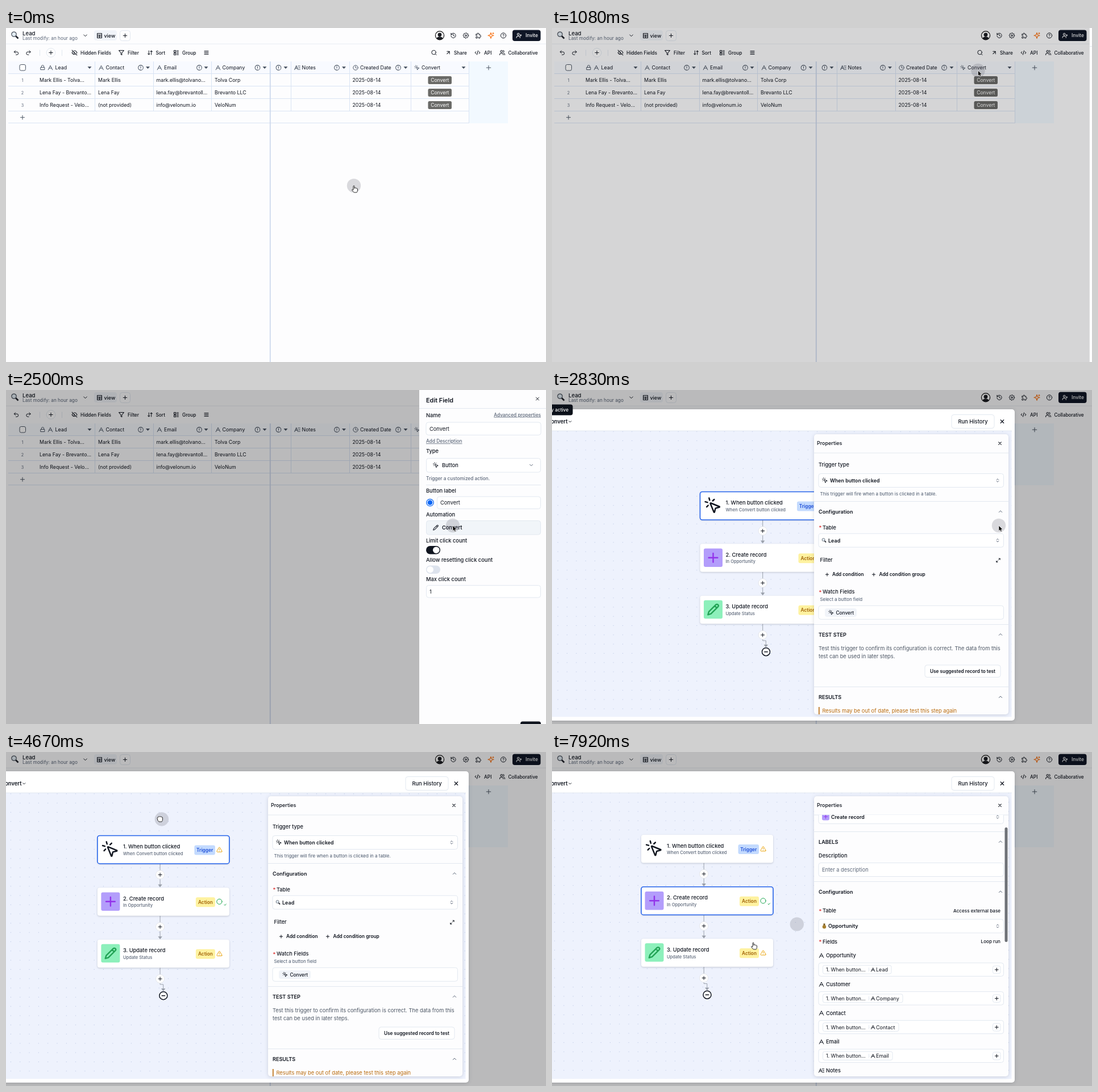
Animation, 950 px wide and 589 px high, one loop 8000 ms. Source, as an HTML page:

```html
<!DOCTYPE html>
<html lang="en">
<head>
<meta charset="utf-8">
<title>Lead conversion</title>
<style>
html, body { margin: 0; width: 100%; height: 100%; overflow: hidden; background: #fdfdfe; }
svg { display: block; width: 100vw; height: 100vh; font-family: Inter, "Open Sans", sans-serif; }
.i { fill: none; stroke-linecap: round; stroke-linejoin: round; }
.node { filter: drop-shadow(0 1.5px 1.5px rgba(30, 41, 59, .22)); }
.box { filter: drop-shadow(0 1px 3px rgba(15, 23, 42, .16)); }
</style>
</head>
<body>
<svg id="stage" viewBox="0 0 950 589"></svg>
<script>
const INK = '#10151f', GREY = '#5b6678', LINE = '#e2e8f0', GRID = '#d9e4f4', BLUE = '#2563eb';
const RING = 'M22 12a10 10 0 1 1-20 0 10 10 0 0 1 20 0z';

const gear = () => {
  let d = '';
  for (let i = 0; i < 32; i++) {
    const a = i * Math.PI / 16, r = i % 4 < 2 ? 10.5 : 8;
    d += (i ? 'L' : 'M') + (12 + r * Math.cos(a)).toFixed(2) + ' ' + (12 + r * Math.sin(a)).toFixed(2);
  }
  return d + 'zM15 12a3 3 0 1 1-6 0 3 3 0 0 1 6 0z';
};

const ICONS = {
  undo: 'M9 14 4 9l5-5M4 9h10.5a5.5 5.5 0 0 1 0 11H11',
  redo: 'm15 14 5-5-5-5M20 9H9.5a5.5 5.5 0 0 0 0 11H13',
  plus: 'M5 12h14M12 5v14',
  minus: 'M7 12h10',
  x: 'M18 6 6 18M6 6l12 12',
  down: 'm6 9 6 6 6-6',
  up: 'm18 15-6-6-6 6',
  updown: 'm7 15 5 5 5-5M7 9l5-5 5 5',
  eyeoff: 'M9.9 4.2A9 9 0 0 1 12 4c7 0 10 8 10 8a13 13 0 0 1-1.7 2.7M6.6 6.6A13.5 13.5 0 0 0 2 12s3 7 10 7a9.7 9.7 0 0 0 5.4-1.6M2 2l20 20M10 10a3 3 0 0 0 4 4',
  filter: 'M22 3H2l8 9.5V19l4 2v-8.5z',
  sort: 'm3 16 4 4 4-4M7 20V4M21 8l-4-4-4 4M17 4v16',
  group: 'M3 3h7v7H3zM3 14h7v7H3zM14 4h7M14 9h7M14 15h7M14 20h7',
  menu: 'M4 6h16M4 12h16M4 18h16',
  search: 'M19 11a8 8 0 1 1-16 0 8 8 0 0 1 16 0zM21 21l-4.3-4.3',
  share: 'M7 7h10v10M7 17 17 7',
  code: 'm18 16 4-4-4-4M6 8l-4 4 4 4M14.5 4l-5 16',
  users: 'M16 21v-2a4 4 0 0 0-4-4H6a4 4 0 0 0-4 4v2M13 7a4 4 0 1 1-8 0 4 4 0 0 1 8 0zM22 21v-2a4 4 0 0 0-3-3.9M16 3.1a4 4 0 0 1 0 7.8',
  invite: 'M16 21v-2a4 4 0 0 0-4-4H6a4 4 0 0 0-4 4v2M13 7a4 4 0 1 1-8 0 4 4 0 0 1 8 0zM19 8v6M22 11h-6',
  history: 'M3 12a9 9 0 1 0 9-9 9.7 9.7 0 0 0-6.7 2.7L3 8M3 3v5h5M12 7v5l4 2',
  gear: gear(),
  puzzle: 'M8 7V5a2.5 2.5 0 0 1 5 0v2h5v5h1.5a2.5 2.5 0 0 1 0 5H18v5h-5v-1.5a2.5 2.5 0 0 0-5 0V22H3v-5h1.5a2.5 2.5 0 0 0 0-5H3V7z',
  spark: 'M12 2l2.5 7.5L22 12l-7.5 2.5L12 22l-2.5-7.5L2 12l7.5-2.5zM20 2v4M18 4h4',
  help: RING + 'M9.1 9a3 3 0 0 1 5.8 1c0 2-3 3-3 3M12 17h.01',
  info: RING + 'M12 7v6M12 16.5h.01',
  clock: RING + 'M12 6v6l4 2',
  check: RING + 'm8.5 12 2.5 2.5 5-5',
  lock: 'M4 11h16v10H4zM7 11V7a5 5 0 0 1 10 0v4',
  text: 'M3 21 12 3l9 18M6.5 14h11',
  notes: 'M1 20 8 4l7 16M4 14h8M15 5h8M17 12h6M18 19h5',
  click: 'M14 4.1 12 6M5.1 8l-2.9-.8M6 12l-1.9 2M7.2 2.2 8 5.1M9 9.7a.5.5 0 0 1 .7-.7l11 4.5a.5.5 0 0 1-.1 1l-4.3 1a1 1 0 0 0-.8.8l-1 4.3a.5.5 0 0 1-1 .1z',
  pencil: 'M21.2 6.8a1 1 0 0 0-4-4L3.8 16.2 2 22l5.8-1.8zM15 5l4 4',
  table: 'M3 3h18v18H3zM3 9h18M3 15h18M12 9v12',
  expand: 'M15 3h6v6M9 21H3v-6M21 3l-7 7M3 21l7-7',
  warn: 'm21.7 18-8-14a2 2 0 0 0-3.5 0l-8 14A2 2 0 0 0 4 21h16a2 2 0 0 0 1.7-3zM12 9v4M12 17h.01'
};

const R = (x, y, w, h, fill, stroke = 'none', rx = 0, more = '') =>
  `<rect x="${x}" y="${y}" width="${w}" height="${h}" rx="${rx}" fill="${fill}" stroke="${stroke}" ${more}/>`;
const C = (x, y, r, fill, stroke = 'none', sw = 1) =>
  `<circle cx="${x}" cy="${y}" r="${r}" fill="${fill}" stroke="${stroke}" stroke-width="${sw}"/>`;
const P = (d, stroke, sw = 1, fill = 'none') =>
  `<path d="${d}" fill="${fill}" stroke="${stroke}" stroke-width="${sw}"/>`;
const T = (x, y, s, size = 9.4, weight = 400, fill = INK, anchor = 'start', more = '') =>
  `<text x="${x}" y="${y}" font-size="${size}" font-weight="${weight}" fill="${fill}" text-anchor="${anchor}" ${more}>${s}</text>`;
const I = (name, x, y, size = 11, color = INK, sw = 1) => {
  const k = size / 24;
  return `<path class="i" d="${ICONS[name]}" stroke="${color}" stroke-width="${(sw / k).toFixed(2)}" transform="translate(${x - size / 2} ${y - size / 2}) scale(${k})"/>`;
};
const G = (id, body, more = '') => `<g id="${id}" ${more}>${body}</g>`;
const H = (x1, x2, y, color = LINE) => P(`M${x1} ${y}H${x2}`, color);
const V = (x, y1, y2, color = GRID) => P(`M${x} ${y1}V${y2}`, color);
const lens = (x, y, k) => `<g transform="translate(${x} ${y}) scale(${k})">` +
  P('M1.5 1.5 6 6', '#20242c', 2.6) + C(-1.5, -1.5, 4.2, '#e3edf5', '#4b525d', 1.2) + '</g>';
const under = 'text-decoration="underline"';

function header() {
  const icons = ['history', 'gear', 'puzzle'].map((n, i) => I(n, 787 + 22 * i, 13.3, 11)).join('');
  return H(0, 950, 28, '#e8ecf2') + lens(15.5, 12.5, 1) + T(29, 13, 'Lead', 9.6, 500) +
    T(29, 21, 'Last modify: an hour ago', 8.25, 400, GREY) + I('down', 139.5, 13.3, 11) +
    R(155, 4, 40, 18, '#f1f4f9', 'none', 4) + I('table', 164.5, 13.5, 10.5) + T(172.5, 16.6, 'view', 8.9, 500) +
    R(200.5, 4.5, 18, 18, 'none', LINE, 4) + I('plus', 209.5, 13.4, 11) +
    C(763, 13.3, 7.6, '#fff', '#111', 1.2) + C(763, 11.8, 3.4, '#1b1d22') + P('M757.6 18.2a5.6 4 0 0 1 10.8 0A7 7 0 0 1 757.6 18.2z', 'none', 0, '#1b1d22') +
    icons + I('spark', 853, 13.3, 12, '#f97316', 1.2) + I('help', 875, 13.3, 11) +
    R(891, 3.5, 49.5, 19.5, '#0f1626', 'none', 4) + I('invite', 902.5, 13.3, 10.5, '#fff') + T(914, 16.4, 'Invite', 8.4, 500, '#fff');
}

function toolbar() {
  const items = [['eyeoff', 120.5, 131, 'Hidden Fields'], ['filter', 203, 214, 'Filter'], ['sort', 253.5, 263.5, 'Sort'],
    ['group', 299.5, 310, 'Group'], ['share', 778, 788, 'Share'], ['code', 829.5, 841, 'API'], ['users', 873, 883.5, 'Collaborative']];
  return I('undo', 18, 43.5) + I('redo', 39.5, 43.5) + V(59.5, 38.5, 49, LINE) + C(79, 43.5, 7.8, '#fff', LINE) +
    I('plus', 79, 43.5) + V(98.5, 38.5, 49, LINE) + I('menu', 352.5, 43.5, 10.5) + I('search', 753, 43.5) +
    items.map(([n, x, tx, s]) => I(n, x, 43.5, 10.5) + T(tx, 46.6, s, 8.25, 500)).join('');
}

function grid() {
  const slate = '#4b5563';
  const cols = [['text', 78, 86.5, 'Lead', 0, 147], ['text', 167.5, 175.5, 'Contact', 237, 249.5], ['text', 270, 278, 'Email', 340, 352],
    ['text', 373, 380.5, 'Company', 442.5, 455], ['', 0, 0, '', 479.5, 492], ['notes', 512.5, 520.5, 'Notes', 582, 594.5],
    ['clock', 615, 623, 'Created Date', 690, 703], ['click', 723, 731, 'Convert', 0, 805]];
  const rows = [['Mark Ellis - Tolva...', 'Mark Ellis', 'mark.ellis@tolvano...', 'Tolva Corp'],
    ['Lena Fay - Brevanto...', 'Lena Fay', 'lena.fay@brevantoll...', 'Brevanto LLC'],
    ['Info Request - Velo...', '(not provided)', 'info@velonum.io', 'VeloNum']];
  let s = R(4, 59, 811, 22, '#f8faff') + R(815, 59, 68, 109, '#f2f9ff') + R(4, 81, 811, 22, '#eff3fa', 'none', 0, 'id="hover" visibility="hidden"');
  s += [81, 103, 125, 147, 168].map(y => H(4, 815, y - .5, GRID)).join('');
  s += [156.5, 259.5, 361.5, 501.5, 604.5, 712.5].map(x => V(x, 59, 147)).join('') + V(814.5, 59, 168);
  s += P('M464.8 59V589', '#cdd9ec', 1.8);
  s += R(24, 64.5, 10.5, 10.5, '#fff', slate, 2.5) + I('lock', 64.5, 69.8, 10, slate);
  for (const [n, ix, tx, label, info, tri] of cols) {
    if (n) s += I(n, ix, 70, n === 'notes' ? 10.5 : 10, slate) + T(tx, 73.1, label, 8.8);
    if (info) s += I('info', info, 70, 10.5, slate);
    s += P(`M${tri - 3.5} 68h7l-3.5 4z`, 'none', 0, slate);
  }
  rows.forEach((row, i) => {
    const y = 94.9 + 22 * i;
    s += T(29, y - .3, i + 1, 7.2, 400, GREY, 'middle');
    [59, 162, 264.5, 367].forEach((x, j) => s += T(x, y, row[j], 8.8));
    s += T(609.5, y, '2025-08-14', 8.8) + R(742.5, y - 10, 41.5, 14, '#6a6a67', 'none', 2.5) + T(763.3, y, 'Convert', 8.6, 400, '#fff', 'middle');
  });
  return s + I('plus', 29, 157.7, 12, slate) + I('plus', 849, 70, 13, slate);
}

function sheet() {
  const field = (y, h) => R(739.5, y, 201, h, '#fff', LINE, 4);
  const label = (y, s) => T(739, y, s, 9.3, 500);
  return R(727, 0, 223, 589, '#fdfdfe') + T(739, 22, 'Edit Field', 10.9, 600) + I('x', 935, 15.5, 10) + H(727, 950, 32.5) +
    label(48, 'Name') + T(941, 46.6, 'Advanced properties', 8.25, 500, GREY, 'end', under) +
    R(739, 57, 202, 22.4, '#fff', LINE, 4, 'id="ring"') + R(745, 62, 35.5, 13, '#d5bcdc', 'none', 0, 'id="marked"') + T(745, 71.8, 'Convert', 9.3) +
    T(739, 93.3, 'Add Description', 8.25, 500, GREY, 'start', under) + label(111, 'Type') + field(120.5, 24.5) +
    I('click', 756, 132.5, 11) + T(767, 135.8, 'Button', 9.2, 500) + I('down', 924, 132.5, 10, GREY) +
    T(739, 158.8, 'Trigger a customized action.', 8.25, 500, GREY) + H(739, 941, 167.5) + label(180.8, 'Button label') +
    C(746, 198.5, 6.2, '#fff', '#0b66f5', 1.3) + C(746, 198.5, 4.3, '#0b66f5') + R(758.5, 188, 182, 21.5, '#fff', LINE, 4) + T(764, 202.3, 'Convert', 9.3) +
    label(223.3, 'Automation') + R(739.5, 230.5, 201, 24.5, '#fff', LINE, 4, 'id="auto"') + I('pencil', 756, 242.6, 10.5) + T(767, 245.8, 'Convert', 9.2, 600) +
    label(268.5, 'Limit click count') + R(739, 275, 25, 14.5, INK, 'none', 7.25) + C(756.8, 282.2, 5.8, '#fff') +
    label(302.7, 'Allow resetting click count') + R(739, 309.5, 25, 14.5, '#dde3ed', 'none', 7.25) + C(746.2, 316.7, 5.8, '#fff') +
    label(337, 'Max click count') + field(344.5, 21.5) + T(745, 358.6, '1', 9.3) + R(905, 584.5, 36, 20, INK, 'none', 4);
}

function node(y, title, sub, icon, badge, mark, id) {
  const blue = badge === 'Trigger', [bx, bw] = blue ? [331, 36.5] : [333.5, 34];
  return R(160.5, y, 232, 49.5, '#fff', 'none', 4, 'class="node"') + R(160.5, y, 232, 49.5, 'none', BLUE, 4, `id="${id}" stroke-width="1.6"`) +
    icon + T(205.5, y + 22.5, title, 9.3, 500) + T(205.5, y + 34.2, sub, 7.6, 500, GREY) +
    R(bx, y + 17, bw, 17, blue ? '#c3dafe' : '#fef2a0', 'none', 3) +
    T(bx + bw / 2, y + 28.5, badge, 8.3, 600, blue ? '#1d4ed8' : '#a16207', 'middle') +
    I(mark, 375, y + 24.7, 11, mark === 'warn' ? '#eaa510' : '#16a34a');
}

function flow() {
  const tile = (y, fill, n, size, color) => R(167, y, 33, 32.5, fill, 'none', 3) + I(n, 183.5, y + 16.3, size, color, 2.4);
  const link = y => P(`M270.7 ${y - 19.5}V${y + 18}`, '#9ba1ab') + P(`M267 ${y + 17}h7.4l-3.7 5z`, 'none', 0, '#9ba1ab');
  const add = y => C(270.7, y, 7.6, '#fff', '#e5e7eb') + I('plus', 270.7, y, 10.5);
  return link(216) + add(216) + link(307.8) + add(307.8) +
    P('M270.7 380v29.5h5.6v8', '#9ba1ab') + P('M272.6 416.5h7.4l-3.7 5z', 'none', 0, '#9ba1ab') + add(399.5) +
    C(276.5, 429.2, 7, '#fff', INK, 1.5) + I('minus', 276.5, 429.2, 13, INK, 1.5) +
    node(147, '1. When button clicked', 'When Convert button clicked', I('click', 182.7, 171, 32, INK, 2.5), 'Trigger', 'warn', 'sel1') +
    node(238.7, '2. Create record', 'In Opportunity', tile(247, '#b39dfb', 'plus', 27, '#9333ea'), 'Action', 'check', 'sel2') +
    node(330.3, '3. Update record', 'Update Status', tile(338.3, '#8df0bb', 'pencil', 22, '#22a355'), 'Action', 'warn', 'sel3') +
    G('more', R(366.5, 218, 21.5, 18, '#fff', LINE, 3) + [373.8, 377.2, 380.6].map(x => C(x, 227, .9, INK)).join(''));
}

const select = (y, s, icon) => R(469, y, 325.5, 24, '#fff', LINE, 4) + icon + I('updown', 784, y + 12, 8.5, GREY);
const section = (y, s) => T(469, y, s, 9.1, 600) + I('up', 789, y - 3.5, 11, GREY);
const need = (y, s) => T(469.5, y + .5, '*', 9.4, 500, '#dc2626') + T(476, y, s, 9.2, 500);
const rule = y => H(461, 803, y);

function trigger() {
  return T(469, 135.2, 'Trigger type', 9.2, 500) + select(147.5) + I('click', 480, 159.3, 11) + T(489, 162.5, 'When button clicked', 8.8, 600) +
    T(471.5, 185.5, 'This trigger will fire when a button is clicked in a table.', 8, 400, '#475569') + rule(196.5) +
    section(217.7, 'Configuration') + need(245.7, 'Table') + select(253.2) + lens(478.5, 265, .6) + T(486, 268.5, 'Lead', 9, 600) +
    T(471.5, 302.6, 'Filter', 9.2, 500) + I('expand', 785, 300.3, 8.5) +
    I('plus', 484, 325.3, 9) + T(493, 328.3, 'Add condition', 8.25, 600) + I('plus', 566, 325.3, 9) + T(575.5, 328.3, 'Add condition group', 8.25, 600) +
    need(359.4, 'Watch Fields') + T(471.5, 371.7, 'Select a button field', 7.9, 400, '#475569') +
    R(469, 380.3, 325.5, 24, '#fff', LINE, 4) + R(480, 385, 56, 15, '#f1f4f9', 'none', 4) + I('click', 491, 392.4, 10) + T(499.5, 395.6, 'Convert', 8.3, 500) +
    rule(413.5) + section(434.6, 'TEST STEP') +
    T(469, 459.2, 'Test this trigger to confirm its configuration is correct. The data from this', 9.3, 400, '#4b5563') +
    T(469, 472.8, 'test can be used in later steps.', 9.3, 400, '#4b5563') +
    R(656, 485, 133, 21.5, '#fff', LINE, 4) + T(722.5, 498.8, 'Use suggested record to test', 8.25, 600, INK, 'middle') +
    rule(523.5) + section(544.8, 'RESULTS') + R(469, 559, 1.6, 13, '#b8690a') +
    T(475.5, 569.3, 'Results may be out of date, please test this step again', 9.3, 400, '#b8690a');
}

function creator() {
  const fields = [['Opportunity', 'Lead', 597], ['Customer', 'Company', 617], ['Contact', 'Contact', 610], ['Email', 'Email', 599]];
  const label = (y, s, icon) => I(icon, 474, y - 3.2, 10) + T(482, y, s, 9.2, 500);
  return T(469, 135.2, 'Action type', 9.2, 500) + select(147.5) + R(475, 152.5, 13, 13, '#b39dfb', 'none', 3) + I('plus', 481.5, 159, 11, '#9333ea') +
    T(491, 162.5, 'Create record', 8.9, 600) + rule(185.5) + section(206.6, 'LABELS') + T(469, 231.3, 'Description', 9.2, 500) +
    R(469, 240.5, 325.5, 24, '#fff', LINE, 4) + T(475, 256.2, 'Enter a description', 9.2, 400, GREY) + rule(273.5) + section(294.8, 'Configuration') +
    need(328, 'Table') + T(789, 327.7, 'Access external base', 8.1, 500, INK, 'end') + select(340) +
    C(479, 353.3, 3.2, '#a8802f') + R(477.5, 347.5, 3, 3, '#7a5a1c') + T(486, 355.4, 'Opportunity', 9, 600) +
    need(382.7, 'Fields') + T(789, 382.4, 'Loop run', 8.1, 500, INK, 'end') +
    fields.map(([name, value, right], i) => {
      const y = 407.2 + 50.7 * i;
      return label(y, name, 'text') + R(469, y + 9.7, 325.5, 23.5, '#fff', LINE, 4) +
        R(476.5, y + 14, right - 476.5, 15, '#fff', LINE, 3) + T(482, y + 25, '1. When button...', 8.8) + V(557.5, y + 18, y + 25, LINE) +
        I('text', 564.7, y + 21.7, 8.5) + T(570, y + 25, value, 9) + R(775.5, y + 15, 13.5, 13.5, '#fff', LINE, 3) + I('plus', 782.3, y + 21.7, 10);
    }).join('') + label(610, 'Notes', 'notes');
}

function modal() {
  return R(-20, 34, 834, 549, '#fff', 'none', 5, 'class="box"') + T(27.5, 58.7, 'Convert', 9.4, 600, INK, 'end') + I('down', 31.8, 55.7, 8) +
    R(703, 43.5, 75, 24, '#fff', LINE, 4) + T(740.5, 58.9, 'Run History', 9.4, 500, INK, 'middle') + I('x', 792, 55.5, 11, INK, 1.2) +
    R(0, 72, 808.5, 504.5, '#eef2fd') + R(0, 72, 808.5, 504.5, 'url(#dots)') + H(0, 809, 72, LINE) +
    `<g clip-path="url(#canvas)">${G('flow', flow())}</g>` +
    R(461, 78, 342, 494, '#fdfdfe', 'none', 5, 'class="box"') + T(466, 97.3, 'Properties', 9, 500) + I('x', 788, 94.2, 9, INK, 1.1) + rule(111) +
    `<g clip-path="url(#pane)">${G('trigger', trigger())}${G('creator', creator())}${R(796.5, 111, 5, 202, '#6f7278', 'none', 2.5, 'id="thumb"')}</g>`;
}

const arrow = P('M0 0v9.7l2.2-2 1.4 3.3 1.8-.7-1.4-3.2h3z', '#fff', .7, '#000');
const hand = P('M-1 1.2a1 1 0 0 1 2 0V5l.3-1a1 1 0 0 1 1.8.3l.2.3a1 1 0 0 1 1.6.5 1 1 0 0 1 1.6.8V8c0 2-.8 3-1.4 4H.3C-1 11-2.5 9-3.2 8c-.6-1 .6-1.9 1.4-1l.8.8z', '#111', .9, '#fff');
const fist = P('M-4 0a1.2 1.2 0 0 1 .6-2.6 1.2 1.2 0 0 1 2.2-1 1.2 1.2 0 0 1 2.2 0 1.2 1.2 0 0 1 2 .6A1.2 1.2 0 0 1 4.5-1.8V1c0 2-1 3-1.5 4h-5c-.8-1-2.4-2.6-2.6-4z', '#111', .9, '#fff');

const clip = (id, x, y, w, h) => `<clipPath id="${id}">${R(x, y, w, h, '#000')}</clipPath>`;
document.getElementById('stage').innerHTML =
  `<defs>${clip('canvas', 0, 72, 461, 504.5)}${clip('pane', 461, 111, 342, 461)}` +
  `<pattern id="dots" width="16.3" height="16.3" patternUnits="userSpaceOnUse">${C(8, 8, .55, '#a9b8dc')}</pattern></defs>` +
  R(0, 0, 950, 589, '#fdfdfe') + header() + toolbar() + grid() + R(0, 0, 950, 589, '#000', 'none', 0, 'id="shade"') +
  G('sheet', sheet()) + G('modal', modal()) +
  G('tip', R(-40, 25.5, 76.5, 19, '#0b1019', 'none', 4) + T(29, 38, 'Currently active', 8.25, 500, '#fff', 'end')) +
  G('halo', C(0, 0, 12.2, 'rgba(110,110,122,.25)')) +
  G('pointer', G('arrow', arrow) + G('hand', hand) + G('fist', fist));

const el = {};
document.querySelectorAll('[id]').forEach(e => el[e.id] = e);
const show = (id, on) => el[id].setAttribute('visibility', on ? 'visible' : 'hidden');
const set = (id, name, v) => el[id].setAttribute(name, v);
const move = (id, x, y) => set(id, 'transform', `translate(${x} ${y})`);
const clamp = v => Math.max(0, Math.min(1, v));
const smooth = v => v * v * (3 - 2 * v);
const cubic = v => v < .5 ? 4 * v ** 3 : 1 - 4 * (1 - v) ** 3;

// pointer stops: time, x, y
const PATH = [[83, 612, 278], [917, 749.5, 75], [1500, 749.5, 75], [1833, 766, 174], [2333, 786, 239], [3167, 786, 239],
  [3500, 426, 196], [3667, 426, 196], [4000, 373.5, 150.5], [4583, 281, 119.5], [4667, 271, 118], [4833, 270, 117],
  [5000, 270, 117], [5667, 270, 200], [5917, 270, 200], [6250, 270.5, 246], [6833, 270.5, 246], [7167, 620, 224],
  [7833, 620, 224], [7917, 354, 336]];

function at(t) {
  let i = 0;
  while (i < PATH.length - 2 && t > PATH[i + 1][0]) i++;
  const [t0, x0, y0] = PATH[i], [t1, x1, y1] = PATH[i + 1];
  const k = smooth(clamp((t - t0) / (t1 - t0)));
  return [x0 + (x1 - x0) * k, y0 + (y1 - y0) * k];
}

const STEP = 1000 / 12, LAG = 30;

function draw(time) {
  const t = Math.floor((time % 8000 + 4) / STEP) * STEP + .5;
  const [px, py] = at(t), [hx, hy] = at(t - LAG);
  move('pointer', px, py);
  move('halo', hx, hy);
  const kind = t < 1000 && py > 82 || t > 6160 ? 'hand' : t > 3740 ? 'fist' : 'arrow';
  ['arrow', 'hand', 'fist'].forEach(k => show(k, k === kind));

  show('hover', t < 1000 && py > 81 && py < 147);
  set('hover', 'y', 81 + 22 * Math.floor((py - 81) / 22));

  set('shade', 'opacity', t < 1080 ? 0 : t < 1160 ? .155 : .265);
  show('sheet', t > 1080 && t < 2740);
  move('sheet', 223 * (1 - cubic(clamp((t - 1000) / 500))), 0);
  const focus = t < 2490;
  set('ring', 'stroke', focus ? '#8f94c4' : LINE);
  set('ring', 'stroke-width', focus ? 1.5 : 1);
  set('marked', 'opacity', focus ? 1 : 0);
  set('auto', 'fill', py > 230 ? '#f1f5f9' : '#fff');

  const open = t > 2660;
  set('modal', 'display', open ? 'inline' : 'none');
  set('modal', 'opacity', t < 2740 ? .4 : t < 2825 ? .8 : 1);
  const zoom = t < 2740 ? .97 : t < 2825 ? .99 : 1;
  set('modal', 'transform', `translate(${400 * (1 - zoom)} ${308 * (1 - zoom)}) scale(${zoom})`);
  show('tip', t > 2825 && t < 3740);

  const [dx, dy] = t < 3990 ? [373.5, 150.5] : at(Math.min(t - LAG, 5000));
  const x = 100 + Math.min(0, dx - 373.5), y = 32.5 + Math.min(0, dy - 150.5);
  move('flow', x, y);
  set('dots', 'patternTransform', `translate(${x} ${y})`);

  const picked = t > 6910;
  set('sel1', 'opacity', picked ? 0 : 1);
  set('sel2', 'opacity', t > 6160 ? 1 : 0);
  set('sel3', 'opacity', 0);
  set('more', 'opacity', t > 6160 && t < 7000 ? 1 : 0);
  set('trigger', 'display', picked ? 'none' : 'inline');
  set('creator', 'display', picked ? 'inline' : 'none');
  const scroll = 45 * smooth(clamp((t - 7417) / 416));
  move('creator', 0, -scroll);
  set('thumb', 'y', 111 + scroll * .49);
  set('thumb', 'opacity', t > 7490 ? 1 : 0);
}

const start = performance.now();
function tick() {
  draw(performance.now() - start);
  requestAnimationFrame(tick);
}
tick();
</script>
</body>
</html>
```
